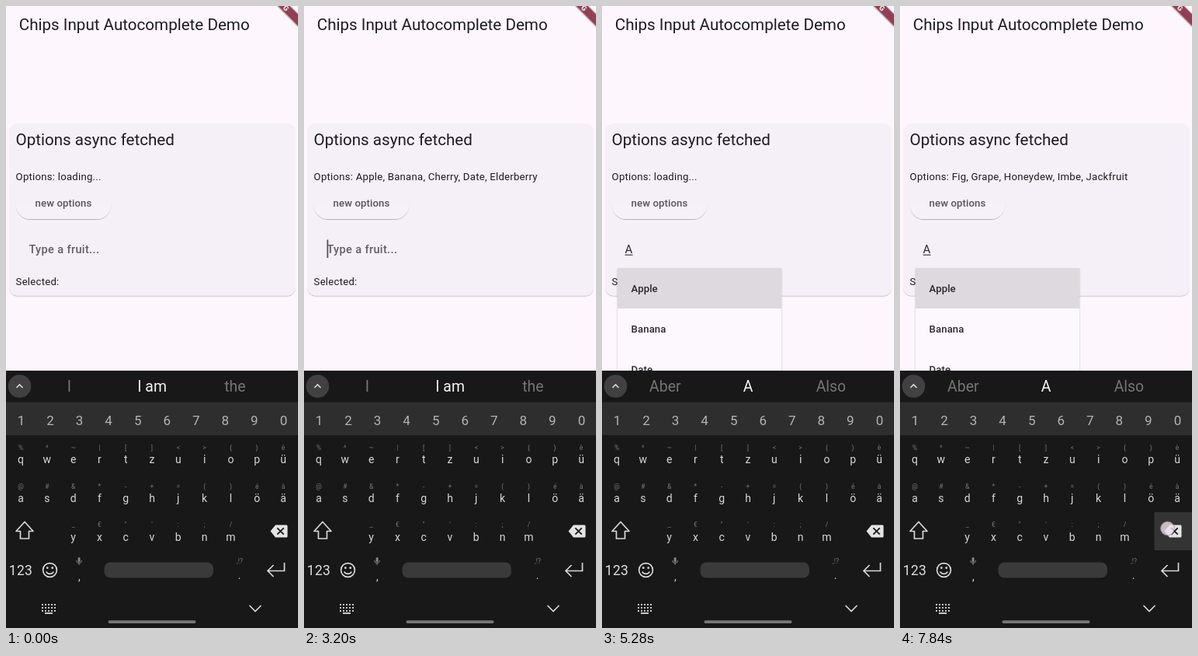
An HTML page for the animation above (8 s loop, 376 by 800 pixels).

```html
<!DOCTYPE html>
<html lang="en">
<head>
<meta charset="utf-8">
<title>Chips Input Autocomplete Demo</title>
<style>
  html, body { margin: 0; width: 100%; height: 100%; overflow: hidden; background: #fdf6fd; }
  svg { display: block; width: 100vw; height: 100vh; font-family: Roboto, "Noto Sans", sans-serif; }
  .title { font-size: 20.6px; fill: #1d1b20; }
  .body { font-size: 13.16px; letter-spacing: .24px; fill: #1d1b20; }
  .menu { font-size: 13.16px; font-weight: 500; letter-spacing: .1px; fill: #2a282d; }
  .button { font-size: 13.16px; font-weight: 500; letter-spacing: .1px; fill: #56525a; }
  .hint { font-size: 14.6px; font-weight: 500; letter-spacing: .33px; fill: #625e65; }
  .typed { font-size: 15px; fill: #2a282d; }
  .key { font-size: 14px; fill: #d8d8d8; text-anchor: middle; }
  .alt { font-size: 8.5px; fill: #777; text-anchor: middle; }
  .digit { font-size: 17px; fill: #b4b4b4; text-anchor: middle; }
  .word { font-size: 19.4px; fill: #757575; text-anchor: middle; }
  .word.main { fill: #f4f4f4; }
  .icon { fill: none; stroke: #d8d8d8; stroke-width: 1.7; }

  .before, .after, .load1, .set1, .load2, .set2, .caret, .press { animation: 8s step-end infinite; }
  .before { animation-name: before; }
  .after { animation-name: after; }
  .load1 { animation-name: load1; }
  .set1 { animation-name: set1; }
  .load2 { animation-name: load2; }
  .set2 { animation-name: set2; }
  .press { animation-name: press; }
  .caret { animation-name: blink, shift; }
  .hint { animation: hint 8s linear infinite; }
  .ripple { animation: ripple 8s linear infinite; }
  .tap { fill: #bdbdbd; stroke: #8d8d8d; stroke-width: .8; opacity: 0; animation: 8s linear infinite; }
  .tap.field { animation-name: tapField; }
  .tap.a { animation-name: tapA; }
  .tap.options { animation-name: tapOptions; }
  .tap.erase { fill: #eadfea; animation-name: tapErase; }

  @keyframes before { 0% { opacity: 1 } 43%, 100% { opacity: 0 } }
  @keyframes after { 0% { opacity: 0 } 43%, 100% { opacity: 1 } }
  @keyframes load1 { 0% { opacity: 1 } 30.8%, 100% { opacity: 0 } }
  @keyframes set1 { 0% { opacity: 0 } 30.8% { opacity: 1 } 63%, 100% { opacity: 0 } }
  @keyframes load2 { 0% { opacity: 0 } 63% { opacity: 1 } 87.8%, 100% { opacity: 0 } }
  @keyframes set2 { 0% { opacity: 0 } 87.8%, 100% { opacity: 1 } }
  @keyframes press { 0% { opacity: 0 } 96.8%, 100% { opacity: 1 } }
  @keyframes blink {
    0%, 18.9%, 30.8%, 48.9%, 60.9%, 73%, 85.8%, 97.8%, 100% { opacity: 0 }
    13%, 25%, 37.2%, 43%, 54.9%, 66.9%, 79.8%, 91.9% { opacity: 1 }
  }
  @keyframes shift { 0% { transform: none } 43%, 100% { transform: translateX(10.4px) } }
  @keyframes hint { 0%, 43.8% { opacity: 1 } 45.8%, 100% { opacity: 0 } }
  @keyframes ripple { 0%, 61.5% { opacity: 0 } 63% { opacity: .1 } 65%, 100% { opacity: 0 } }
  @keyframes tapField { 0%, 9% { opacity: 0 } 10%, 11% { opacity: .5 } 12% { opacity: .25 } 13%, 100% { opacity: 0 } }
  @keyframes tapA { 0%, 41.5% { opacity: 0 } 42.5%, 44.2% { opacity: .5 } 46%, 100% { opacity: 0 } }
  @keyframes tapOptions { 0%, 61% { opacity: 0 } 62%, 63% { opacity: .5 } 64.5%, 100% { opacity: 0 } }
  @keyframes tapErase { 0%, 96% { opacity: 0 } 97.5%, 100% { opacity: .8 } }
</style>
</head>
<body>
<svg viewBox="0 0 376 800" preserveAspectRatio="none">
  <defs>
    <filter id="soft" x="-10%" y="-20%" width="120%" height="140%">
      <feDropShadow dx="0" dy="1.1" stdDeviation=".7" flood-color="#000" flood-opacity=".24"/>
    </filter>
    <filter id="lift" x="-10%" y="-10%" width="120%" height="120%">
      <feDropShadow dx="0" dy="1.2" stdDeviation="1.2" flood-color="#000" flood-opacity=".24"/>
    </filter>
    <clipPath id="low"><rect x="8" y="254" width="132" height="26"/></clipPath>
  </defs>
  <rect width="376" height="800" fill="#fdf6fd"/>
  <text class="title" x="16.8" y="31">Chips Input Autocomplete Demo</text>

  <g transform="translate(358 0) rotate(45)">
    <rect x="-20" y="-5.5" width="70" height="11" fill="#914152" filter="url(#lift)"/>
    <text x="0.6" y="3.4" font-size="9.3" font-weight="900" fill="#f6e8ec">G</text>
  </g>

  <rect x="4" y="151" width="369" height="221.5" rx="11" fill="#f5f0f7" filter="url(#soft)"/>
  <text class="title" x="12.5" y="179">Options async fetched</text>
  <g class="body">
    <text class="load1" x="12.6" y="223.5">Options: loading...</text>
    <text class="set1" x="12.6" y="223.5">Options: Apple, Banana, Cherry, Date, Elderberry</text>
    <text class="load2" x="12.6" y="223.5">Options: loading...</text>
    <text class="set2" x="12.6" y="223.5">Options: Fig, Grape, Honeydew, Imbe, Jackfruit</text>
    <text x="12.6" y="359">Selected:</text>
  </g>
  <g clip-path="url(#low)">
    <rect x="12.5" y="236.5" width="123" height="37.6" rx="18.8" fill="#f6f1f8" filter="url(#soft)"/>
  </g>
  <rect class="ripple" x="12.5" y="236.5" width="123" height="37.6" rx="18.8" fill="#6750a4"/>
  <text class="button" x="37.6" y="258">new options</text>

  <text class="hint" x="29.5" y="317.5">Type a fruit...</text>
  <g class="after">
    <text class="typed" x="29.6" y="318">A</text>
    <rect x="29.6" y="319.6" width="10" height="1.1" fill="#2a282d"/>
  </g>
  <rect class="caret" x="29.5" y="300.5" width="1.8" height="23.5" fill="#55515a"/>

  <g class="after">
    <rect x="20" y="337" width="211" height="150" fill="#fdf8fd" filter="url(#lift)"/>
    <rect x="20" y="337" width="211" height="52" fill="#ded9df"/>
    <g class="menu">
      <text x="37.6" y="367.5">Apple</text>
      <text x="37.6" y="419.5">Banana</text>
      <text x="37.6" y="471.5">Date</text>
    </g>
  </g>

  <rect y="469" width="376" height="331" fill="#181818"/>
  <rect y="509.5" width="376" height="42.5" fill="#2e2e2e"/>
  <rect class="press" x="327.5" y="651" width="48.5" height="49" fill="#343434"/>
  <circle cx="17.5" cy="489" r="14.8" fill="#414141"/>
  <path class="icon" d="M13.5 491 l4 -4 l4 4" stroke-width="1.4"/>
  <g id="keys"></g>

  <!-- shift, erase -->
  <path class="icon" d="M24 663.5 L35 675.5 H29.5 V685 H18.5 V675.5 H13 Z" stroke-linejoin="round"/>
  <path d="M340.5 675.5 L347 667.5 H361 Q362.5 667.5 362.5 669 V682 Q362.5 683.5 361 683.5 H347 Z" fill="#e4e4e4"/>
  <path d="M349.3 671.3 l8.4 8.4 m0 -8.4 l-8.4 8.4" stroke="#181818" stroke-width="1.8"/>

  <!-- bottom row -->
  <text x="19" y="732" font-size="17.5" fill="#dedede" text-anchor="middle" letter-spacing=".3">123</text>
  <circle class="icon" cx="56.5" cy="725.5" r="8.9"/>
  <path class="icon" d="M51.8 727.5 a5 4.4 0 0 0 9.4 0"/>
  <circle cx="53.3" cy="722.7" r="1.4" fill="#d8d8d8"/>
  <circle cx="59.7" cy="722.7" r="1.4" fill="#d8d8d8"/>
  <rect x="92.6" y="709" width="3" height="6.4" rx="1.5" fill="#858585"/>
  <path d="M90.7 713 a3.4 3.7 0 0 0 6.8 0 M94.1 716.7 v2.3" fill="none" stroke="#858585"/>
  <rect x="126.5" y="715.5" width="140.5" height="20" rx="8" fill="#3a3a3a"/>
  <path class="icon" d="M358.5 716 V726.5 H337.5 M344.5 719 L337 726.5 L344.5 734" stroke-width="1.9"/>

  <!-- navigation bar -->
  <g fill="#c8c8c8" id="board"></g>
  <path class="icon" d="M313.5 771 L321 778.5 L328.5 771"/>
  <rect x="131.5" y="790.2" width="113" height="3.8" rx="1.9" fill="#777"/>

  <circle class="tap field" cx="62.5" cy="313" r="8"/>
  <circle class="tap a" cx="11.5" cy="641" r="9"/>
  <circle class="tap options" cx="75" cy="255" r="9"/>
  <circle class="tap erase" cx="344.5" cy="672" r="9"/>
</svg>
<script>
  const NS = "http://www.w3.org/2000/svg";
  const keys = document.getElementById("keys");
  const board = document.getElementById("board");

  function add(parent, tag, attrs, content = "") {
    const el = document.createElementNS(NS, tag);
    for (const name in attrs) el.setAttribute(name, attrs[name]);
    el.textContent = content;
    parent.append(el);
  }
  const label = (cls, x, y, text) => add(keys, "text", { class: cls, x, y }, text);

  function row(chars, cls, y, x0, step) {
    [...chars].forEach((c, i) => label(cls, x0 + i * step, y, c));
  }

  row("1234567890", "digit", 539, 19.5, 37.55);
  row("qwertzuiopü", "key", 587.5, 19, 33.8);
  row("%^~|[]<>{}è", "alt", 571, 19, 33.8);
  row("asdfghjklöä", "key", 637.5, 19, 33.8);
  row("@#&*-+=()éà", "alt", 621, 19, 33.8);
  row("yxcvbnm", "key", 687.5, 86.6, 33.8);
  row("_€\"':;/", "alt", 670, 86.6, 33.8);
  label("key", 94.5, 739, ",");
  label("key", 300.5, 737, ".");
  label("alt", 301, 717, ",!?");

  function words(state, list) {
    list.forEach((w, i) => label(`word ${state}${i === 1 ? " main" : ""}`, 81.3 + i * 106.8, 495.5, w));
  }
  words("before", ["I", "I am", "the"]);
  words("after", ["Aber", "A", "Also"]);

  for (let r = 0; r < 3; r++)
    for (let c = 0; c < 5; c++)
      add(board, "rect", { x: 46 + c * 4, y: 769 + r * 4, width: 2, height: 2 });
  add(board, "rect", { x: 50, y: 780, width: 10, height: 2 });
</script>
</body>
</html>
```
